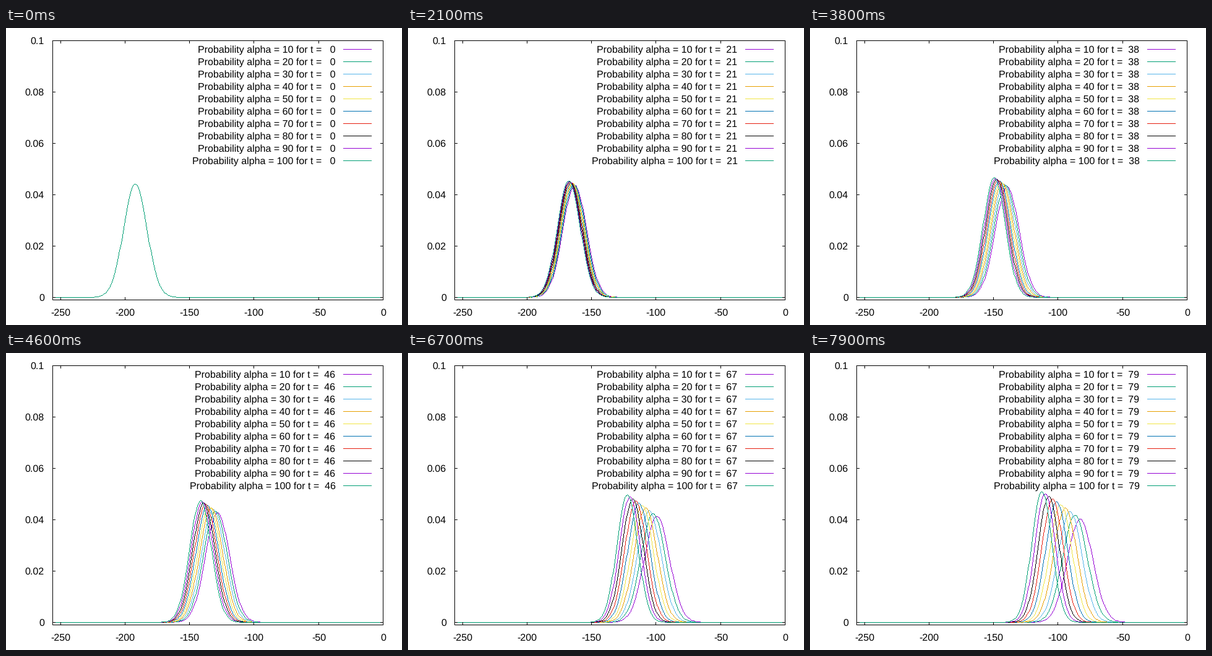
Animation, 640 px wide and 480 px high, one loop 8000 ms. Source, as a matplotlib script:

```python
import numpy as np
import matplotlib.pyplot as plt
from matplotlib.animation import FuncAnimation
from matplotlib.colors import to_rgb

W, H, DPI = 640, 480, 100
FRAMES, INTERVAL = 80, 100
LEFT, RIGHT, TOP, BOTTOM = 75, 609, 20, 439
X_MIN, X_MAX, Y_MIN, Y_MAX = -256, 0, -0.001, 0.1
COLORS = ["#9400d3", "#009e73", "#56b4e9", "#e69f00", "#f0e442",
          "#0072b2", "#e51e10", "#000000", "#9400d3", "#009e73"]
ALPHAS = range(10, 101, 10)

plt.rcParams.update({
    "font.family": "Liberation Sans",
    "font.size": 16 * 72 / DPI,
    "text.hinting": "no_hinting",
    "text.hinting_factor": 8,
})

# Data units are pixels, with whole numbers at pixel centres
fig = plt.figure(figsize=(W / DPI, H / DPI), dpi=DPI, facecolor="white")
ax = fig.add_axes([0, 0, 1, 1])
ax.axis("off")
blank = np.full((H, W, 3), 255, np.uint8)
plot = ax.imshow(blank, interpolation="nearest", aspect="auto", zorder=1)
ax.set_xlim(-0.5, W - 0.5)
ax.set_ylim(H - 0.5, -0.5)


def px(x):
    return np.rint(LEFT + (x - X_MIN) / (X_MAX - X_MIN) * (RIGHT - LEFT))


def py(y):
    return np.rint(BOTTOM - (y - Y_MIN) / (Y_MAX - Y_MIN) * (BOTTOM - TOP))


def line(xs, ys, color="black"):
    ax.plot(xs, ys, color=color, lw=72 / DPI, snap=False,
            solid_capstyle="projecting", solid_joinstyle="miter", zorder=3)


def label(x, y, s, ha):
    return ax.text(x, y, s, ha=ha, va="baseline", color="black", zorder=4)


def stroke(canvas, xs, ys, color):
    """Draw a one-pixel polyline without smoothing."""
    steps = np.maximum(np.abs(np.diff(xs)), np.abs(np.diff(ys)))
    pos = np.concatenate([[0], np.cumsum(steps)])
    at = np.arange(pos[-1] + 1)
    cols = np.rint(np.interp(at, pos, xs)).astype(int)
    rows = np.rint(np.interp(at, pos, ys)).astype(int)
    canvas[rows, cols] = color


def peak(alpha, t):
    """Centre and height of the distribution."""
    a, b = alpha - 10, alpha - 100
    speed = (1.372 + 5.5e-4 * t - 5.5e-6 * t**2
             - (1.8e-3 + 3e-5 * t) * a + 1.4e-7 * t * a * b)
    u = a / 90
    low = -5e-6 * t - 5.5e-7 * t**2
    high = 5e-5 * t + 4.7e-7 * t**2
    bulge = 5.2e-7 * t**2 * u * (1 - u)
    return -192 + speed * t, 0.0441 + low + (high - low) * u + bulge


def density(x, alpha, t):
    mean, height = peak(alpha, t)
    return height * np.exp(-np.pi * (height * (x - mean))**2)


# Frame, mirrored ticks and tick labels
line([LEFT, RIGHT, RIGHT, LEFT, LEFT], [TOP, TOP, BOTTOM, BOTTOM, TOP])
for v in range(-250, 1, 50):
    x = px(v)
    line([x, x], [BOTTOM, BOTTOM - 4])
    line([x, x], [TOP, TOP + 4])
    label(x, 464, str(v), "center")
for i in range(6):
    v = i * 0.02
    y = py(v)
    line([LEFT, LEFT + 4], [y, y])
    line([RIGHT, RIGHT - 4], [y, y])
    label(61.5, y + 5, f"{v:.2g}", "right")

keys = []
for i, color in enumerate(COLORS):
    y = 34 + 20 * i
    line([545, 590], [y, y], color)
    keys.append(label(532, y + 5, "", "right"))

sites = np.arange(X_MIN, X_MAX + 1)
inks = [np.rint(np.array(to_rgb(c)) * 255) for c in COLORS]


def update(t):
    canvas = blank.copy()
    for alpha, ink, key in zip(ALPHAS, inks, keys):
        stroke(canvas, px(sites), py(density(sites, alpha, t)), ink)
        key.set_text(f"Probability alpha = {alpha} for t = {t:3d}")
    plot.set_data(canvas)
    return [plot] + keys


anim = FuncAnimation(fig, update, frames=FRAMES, interval=INTERVAL,
                     init_func=lambda: update(0), repeat=True, repeat_delay=0)
plt.show()
```
